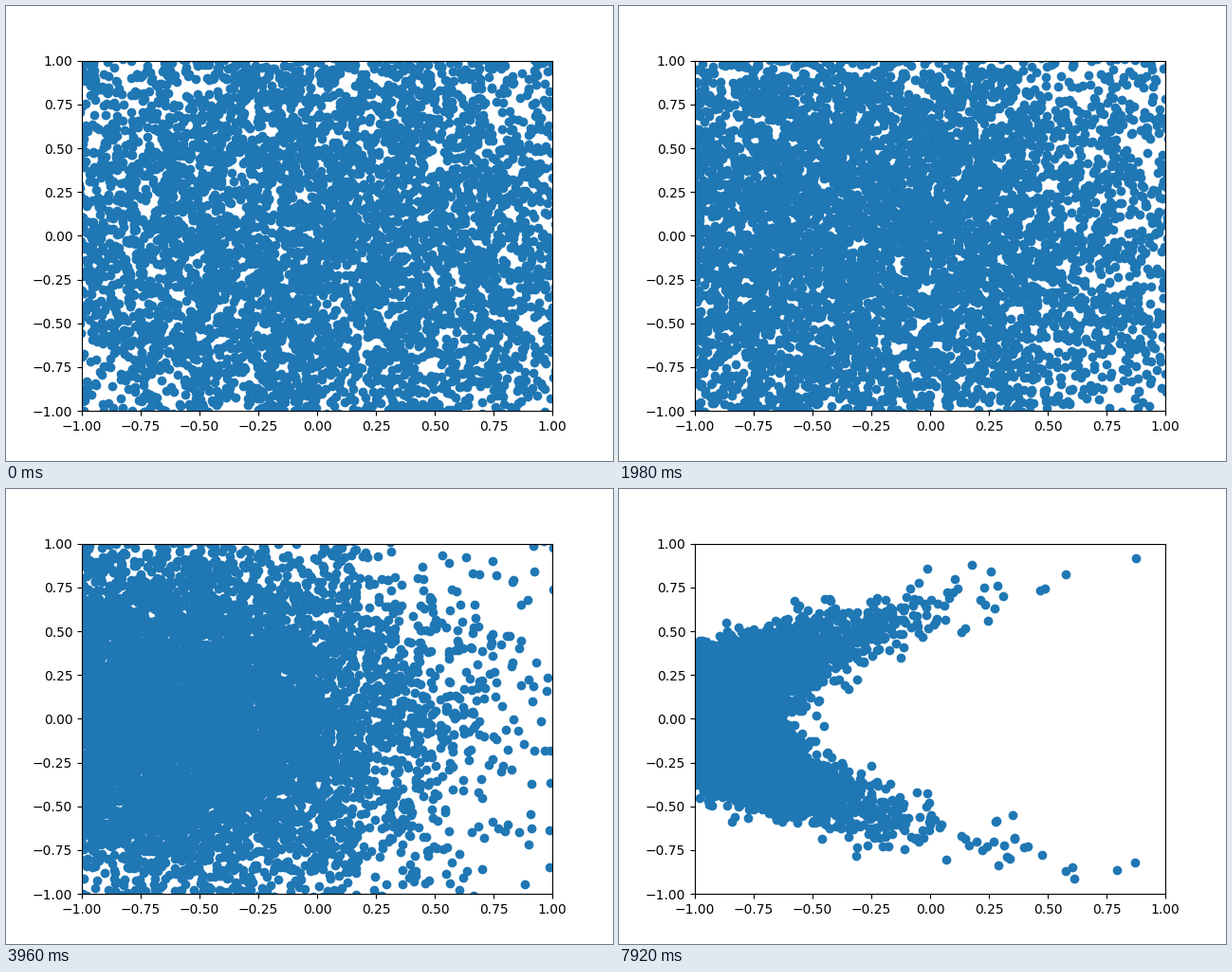
Recreate the animation shown at these times as a matplotlib script. Size 640x480 px, loop 8000 ms.

```python
import numpy as np
import matplotlib.pyplot as plt
from matplotlib.animation import FuncAnimation

N = 10000
STEPS = 25        # distinct poses in one loop
HOLD = 330        # ms per pose
TICK = 40         # ms per drawn frame
LOOP = 8000
KEEP = 0.75       # how much of the noise survives a step

rng = np.random.default_rng(7)


def crescent():
    """Points scattered along a parabola that opens to the right."""
    v = rng.normal(0, 0.235, N)
    x = -0.96 + 2.3 * v ** 2 + rng.normal(0, 0.09, N)
    return np.column_stack([x, v])


def levels(t):
    """Signal level and noise spread in x and y at progress t in 0..1."""
    signal = np.sin(np.pi / 2 * t ** 0.9)
    noise = 0.10 + 0.87 * np.cos(np.pi / 2 * t) ** 2
    return signal, np.array([noise, noise * (1 - 0.22 * t)])


def simulate():
    goal = crescent()
    z = rng.normal(size=(N, 2))
    poses = []
    for t in np.linspace(0, 1, STEPS):
        signal, noise = levels(t)
        poses.append(signal * goal + noise * z)
        z = KEEP * z + np.sqrt(1 - KEEP ** 2) * rng.normal(size=(N, 2))
    return poses


# points far outside the axes are never seen, so they are not drawn
poses = [p[np.all(np.abs(p) < 1.05, axis=1)] for p in simulate()]

fig, ax = plt.subplots(figsize=(6.4, 4.8), dpi=100)
dots = ax.scatter([0], [0], color="C0")
ax.set_xlim(-1, 1)
ax.set_ylim(-1, 1)


def update(i):
    k = min((i * TICK + TICK - 1) // HOLD, STEPS - 1)
    dots.set_offsets(poses[k])
    return dots,


anim = FuncAnimation(fig, update, frames=LOOP // TICK, interval=TICK,
                     repeat=True, repeat_delay=0)
plt.show()
```
